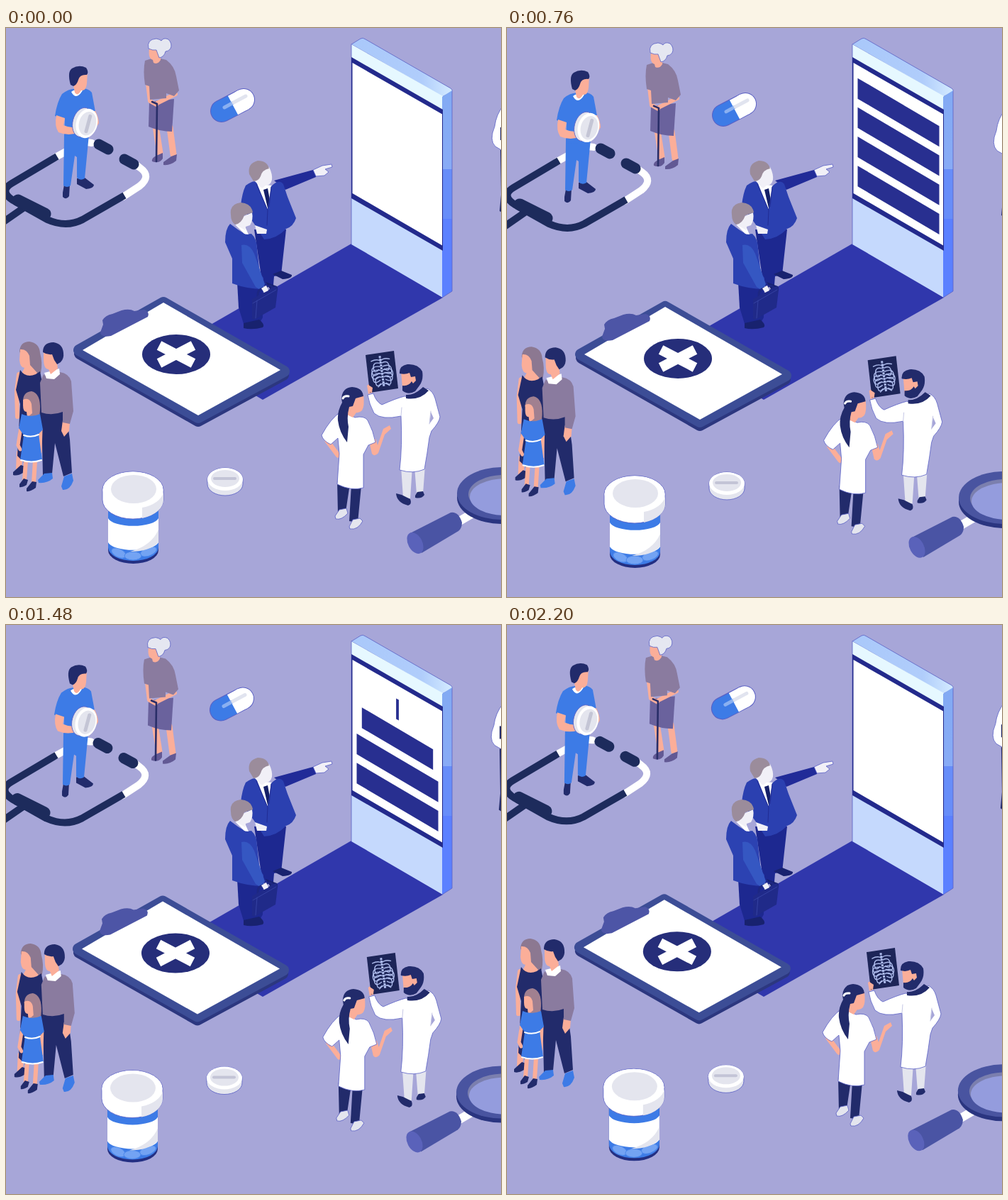
Recreate the animation shown at these times as an HTML page. Size 698 px wide and 802 px high, loop 2.24 s.

```html
<!DOCTYPE html>
<html lang="en">
<head>
<meta charset="utf-8">
<title>Isometric health scene</title>
<style>
html, body { margin: 0; width: 100%; height: 100%; overflow: hidden; background: #a7a6d8; }
svg { display: block; }
.w { fill: #fff; }
.k { fill: #fbae99; }
.b { fill: #3d7be6; }
.n { fill: #222b6b; }
.g { fill: #e4e5ee; }
.m { fill: #8a7b9f; }
.l { fill: none; stroke-linecap: round; stroke-linejoin: round; }
.flat { stroke-linecap: butt; }
.skin { stroke: #fbae99; }
.rim { stroke: #5a60c4; stroke-width: .8; }
</style>
</head>
<body>
<svg width="698" height="802" viewBox="0 0 698 802">
<defs>
  <linearGradient id="side" x2="0" y2="1"><stop stop-color="#82aaf3"/><stop offset=".38" stop-color="#88abf6"/><stop offset=".38" stop-color="#678df9"/><stop offset=".62" stop-color="#678df9"/><stop offset=".62" stop-color="#5b80ff"/></linearGradient>
  <linearGradient id="lip"><stop stop-color="#a9c8fa"/><stop offset=".7" stop-color="#b0cdfb"/><stop offset="1" stop-color="#d4ebff"/></linearGradient>
</defs>

<!-- carpet and phone -->
<path fill="#3037ac" d="M487 304L616 380 362 524 235 449Z"/>
<path fill="url(#lip)" class="rim" d="M487 23L500 15Q503 13 507 16L627 85Q630 87 629 90L615 97Z"/>
<path fill="#e6f8ff" d="M487 23L616 96V116L487 42Z"/>
<path class="w" d="M487 44L616 118V310L487 236Z"/>
<path fill="#c5d9fd" d="M487 238L616 312V380L487 305Z"/>
<path fill="url(#side)" d="M615 97L629 88V371L615 380Z"/>
<path class="l rim" d="M487 305V23M615 380L629 371V90"/>
<path fill="#232a8c" d="M487 41L616 115V122L488.500 49V233L616 307V314L487 240Z"/>
<path class="l" stroke="#232a8c" d="M615.500 116V312"/>
<g id="bars" fill="#282f90"></g>

<!-- pointing man -->
<path fill="#1d2890" d="M350 284L395 284 391 320 388 348 378 350 377 362 362 364Z"/>
<path fill="#18226f" d="M376 347L388 342 403 348Q404 353 390 354ZM366 358L382 364Q386 372 376 374Z"/>
<path fill="#212b98" d="M378 215L433 200Q438 203 437 210L394 228Z"/>
<path fill="#f1f0f7" class="rim" d="M433 200L446 194 459 192 460 196 450 199 455 203 449 208 437 209Z"/>
<path class="w" d="M353 216L366 221 375 222 372 256 364 253Z"/>
<path fill="#141f68" d="M363 228L369 226 374 253 370 258Z"/>
<path fill="#2b40b0" d="M338 222Q349 214 353 217L369 256 374 223Q385 212 391 220L397 238 409 268Q405 280 395 283 382 297 364 298L350 276 331 250Q333 232 338 222Z"/>
<path class="l" stroke="#212c94" d="M353 220L369 257 368 278M374 224L371 252"/>
<path fill="#f1f0f7" d="M357 202L371 196Q376 206 375 214 373 222 366 222L361 226 350 215Z"/>
<path fill="#9b8c9b" d="M343 206Q340 191 355 187 368 187 371 198 361 200 359 209 356 216 349 216Z"/>

<!-- man with briefcase -->
<path fill="#1d2890" d="M326 358L363 365 362 408 357 417 336 420 328 394Z"/>
<path fill="#18226f" d="M335 416L357 411Q366 418 362 422 347 426 335 423Z"/>
<path fill="#2c42b2" d="M316 276Q326 284 338 291L346 290Q354 297 354 311L358 347 363 352V368Q340 368 319 360V325L309 302Q309 283 316 276Z"/>
<path class="w" d="M323 277L337 280 342 291 336 290Z"/>
<path fill="#f1f0f7" d="M334 266L347 260Q349 270 344 278L338 280 337 285 324 277ZM351 278L368 284 367 290 354 290Z"/>
<path fill="#9b8c9b" d="M317 263Q315 248 331 246 346 247 348 260L336 264Q332 276 323 277 317 273 317 263Z"/>
<path fill="#3557c2" d="M332 306Q343 303 350 318L365 361 360 370 352 365 333 331Z"/>
<path class="l" stroke="#1d2782" stroke-width="3" d="M355 378Q354 369 362 367L371 363Q376 363 376 369"/>
<path fill="#202a89" d="M347 382L379 364Q383 364 383 369L380 394 350 411Q346 411 347 406Z"/>
<path class="l" stroke="#3542a3" d="M348 388L381 369M354 384L352 409"/>
<path fill="#f1f0f7" d="M360 367L367 363 370 370 364 373Z"/>

<!-- gently bobbing objects -->
<g id="bob">
  <!-- stethoscope -->
  <g class="l" stroke-width="10">
    <path stroke="#fff" d="M70 182L103 164Q110 160 121 162M165 238L188 223Q206 209 189 197L181 191"/>
    <path class="flat" stroke="#1d2b5c" d="M72 181L8 219Q-10 230 10 243L58 270Q85 282 108 270L167 236M30 250L-12 279"/>
    <path stroke="#1d2b5c" stroke-width="15" d="M131 164L144 171M167 185L180 192"/>
    <path stroke="#1d2b5c" stroke-width="17" d="M17 243L55 262"/>
  </g>

  <!-- nurse with tablet -->
  <path class="n" d="M80 232L82 221 90 220 89 237Q85 243 80 238ZM100 212L111 211 124 221Q124 226 113 227L100 220Z"/>
  <path class="b" d="M82 150H117L111 212Q105 216 100 211V182L97 180 91 222Q86 226 81 222Z"/>
  <path class="b" d="M79 93Q90 84 101 86 115 83 121 91L126 118 114 120 116 156 82 157 83 128 69 124Q72 104 79 93Z"/>
  <path class="k" d="M71 123L83 127 81 137Q92 142 103 139L104 147Q88 153 74 147 68 138 71 123ZM117 117L126 117Q131 127 131 134 128 141 121 139Z"/>
  <path class="w" d="M92 90Q99 103 108 88L105 86 95 88Z"/>
  <path class="k" d="M92 66L97 91Q101 97 106 88 113 89 114 78L115 62Z"/>
  <path class="n" d="M91 80Q86 62 93 57 103 51 113 56 117 62 114 66 104 65 102 73 100 80 95 82Z"/>
  <g transform="rotate(15 112 134)">
    <ellipse class="g rim" cx="108" cy="134" rx="14" ry="21"/>
    <ellipse class="w" cx="114" cy="134" rx="15" ry="21"/>
    <ellipse class="g" cx="115" cy="134" rx="12" ry="17"/>
    <path class="l" stroke="#c4c5d5" stroke-width="5" d="M116 123V145"/>
  </g>

  <!-- elderly woman -->
  <path class="l skin" stroke-width="9" d="M211 138L217 176M231 140L236 178"/>
  <path fill="#625994" d="M206 188Q205 183 212 180L221 176 221 184Q216 192 206 188ZM222 189L233 181 241 178 240 187Q232 194 222 193Z"/>
  <path fill="#6a629d" d="M202 104L237 100 234 146Q217 146 201 139Z"/>
  <path class="l skin" stroke-width="6" d="M200 78L203 103 212 108M239 93L213 106"/>
  <path class="m" d="M196 46Q210 40 226 45 238 54 240 68L244 88 237 96 226 92 226 99 203 101 202 82 196 80Q193 60 196 46Z"/>
  <path class="k" d="M202 29Q200 43 207 45L208 49Q214 52 218 45L218 29Z"/>
  <path class="rim" fill="#e5e7f1" d="M201 29Q198 16 212 15 217 16 219 18 222 13 229 16 235 22 232 29 229 33 225 33 223 41 216 42L212 31Q207 32 201 29Z"/>
  <path class="l" stroke="#292e68" stroke-width="2.6" d="M206 104L213 107 212 188"/>

  <!-- capsule -->
  <g class="l">
    <path stroke="#5a60c4" stroke-width="32" d="M304 117L335 101"/>
    <path stroke="#3d7be6" stroke-width="30" d="M304 117L320 109"/>
    <path stroke="#fff" stroke-width="30" d="M334 101.500L335 101"/>
    <path class="flat" stroke="#fff" stroke-width="30" d="M320 109L335 101"/>
    <path stroke="#8ab0f1" stroke-width="5" d="M308 112L319 106"/>
    <path stroke="#e1e4ef" stroke-width="5" d="M321 105L338 96"/>
  </g>

  <!-- clipboard -->
  <g stroke-width="16" stroke-linejoin="round">
    <path fill="#2c377f" stroke="#2c377f" d="M222 392L391 489 271 554 104 459Z"/>
    <path fill="#3c4d96" stroke="#3c4d96" d="M222 387L392 484 271 549 103 454Z"/>
  </g>
  <path class="w" d="M222 387L387 482 271 546 108 454Z"/>
  <path fill="#4d55a6" d="M133 429L137 418 136 412Q140 405 150 403L163 398Q174 395 181 399L195 397Q203 400 200 407L148 434Q134 437 133 429Z"/>
  <ellipse fill="#262e7a" cx="240" cy="460" rx="48" ry="28"/>
  <path class="l flat" stroke="#fff" stroke-width="14" d="M216 447.500L264 472.500M264 447.500L216 472.500"/>

  <!-- pill bottle -->
  <path fill="#232f82" d="M144 680H215V736A35.5 19 0 0 1 144 736Z"/>
  <path class="b" d="M144 680H215V732A35.5 19 0 0 1 144 732Z"/>
  <g fill="#73a3f3" stroke="#4b87ea">
    <ellipse cx="159" cy="740" rx="11" ry="6" transform="rotate(25 159 740)"/>
    <ellipse cx="201" cy="738" rx="12" ry="6" transform="rotate(-20 201 738)"/>
    <ellipse cx="179" cy="744" rx="12" ry="6"/>
  </g>
  <path class="w" d="M144 691A36 13 0 0 0 215 691V725A36 13 0 0 1 144 725Z"/>
  <path class="g" d="M215 707V725Q202 738 175 738 205 730 215 707Z"/>
  <path class="w rim" d="M136 651V665A43 27 0 0 0 222 665V651A43 26 0 0 0 136 651Z"/>
  <path class="g" d="M222 654V665A43 27 0 0 1 192 691V676A43 26 0 0 0 222 654Z"/>
  <ellipse class="w" cx="179" cy="651" rx="42.500" ry="25.500"/>
  <ellipse class="g" cx="180" cy="650" rx="32" ry="20"/>

  <!-- round tablet -->
  <path class="g rim" d="M284 636V643A25 16 0 0 0 334 643V636A25 16 0 0 0 284 636Z"/>
  <ellipse class="w" cx="309" cy="636" rx="25" ry="16"/>
  <ellipse class="g" cx="309" cy="635" rx="20" ry="12"/>
  <path class="l" stroke="#c3c4d6" stroke-width="4" d="M294 635H323"/>

  <!-- magnifier -->
  <path class="l" stroke="#fff" stroke-width="12" d="M636 697L660 683"/>
  <ellipse fill="#2a3580" cx="700" cy="662" rx="64" ry="37"/>
  <ellipse fill="#4954a0" cx="700" cy="656" rx="64" ry="37"/>
  <ellipse fill="#7b7fae" cx="702" cy="657" rx="50" ry="27"/>
  <ellipse fill="#949cdd" cx="704" cy="661" rx="50" ry="26"/>
  <path fill="#4a54a4" d="M570 712L627 683Q638 681 643 697 643 705 638 709L586 740Z"/>
  <ellipse fill="#5a62ba" cx="577" cy="726" rx="10" ry="16" transform="rotate(-28 577 726)"/>

  <!-- figure at the edge -->
  <path class="w rim" d="M702 108Q691 122 689 139 681 158 690 167L702 174Z"/>
  <path class="n" d="M697 140H702V158H697ZM697 172H702V262L696 258 698 235Z"/>
</g>

<!-- people drifting sideways -->
<g id="drift">
  <!-- family -->
  <path class="k" d="M15 596L24 600 22 620 14 622Z"/>
  <path class="n" d="M10 626L21 616 27 618 24 627Q16 632 10 630Z"/>
  <path class="l skin" stroke-width="6" d="M18 488L15 512 16 548"/>
  <path fill="#8c7891" d="M19 456Q20 442 33 442 47 444 48 458 52 472 49 486L36 490Z"/>
  <path class="k" d="M20 453Q29 452 33 462L34 475 44 486 36 496 22 487 26 479Q20 479 19 468Z"/>
  <path class="n" d="M20 482Q28 494 42 488L48 484 53 510 50 600 25 612 16 603 20 530 14 510Z"/>
  <path class="n" d="M50 538H84L90 580 93 627 81 632 69 585 65 628 52 631Z"/>
  <path class="b" d="M45 637L54 628 65 627 66 635Q58 642 46 641ZM78 646L82 632 93 628 95 638Q90 652 80 651Z"/>
  <path class="k" d="M80 553L90 556 89 568 82 576 78 568Z"/>
  <path class="m" d="M53 488Q62 496 76 485 89 487 92 498L95 540 90 558 80 556V541Q65 547 50 542L48 500Z"/>
  <path class="w" d="M54 486L62 484 75 480 76 488 68 495 57 494Z"/>
  <path class="k" d="M53 455L70 456 73 480 63 488 60 481Q53 481 53 466Z"/>
  <path class="n" d="M52 457Q52 443 67 443 80 445 81 458 82 466 77 471L72 474 68 468 65 460Q58 461 52 457Z"/>
  <path class="l skin" stroke-width="6" d="M28 610L26 638M41 610L39 641"/>
  <path class="n" d="M19 643L25 635 31 637 29 644Q22 648 19 647ZM29 649L37 639 43 640 42 648Q34 654 29 653Z"/>
  <path fill="#a18090" d="M24 526Q24 513 36 512 49 515 48 538L47 551 34 549Z"/>
  <path class="k" d="M24 524Q33 520 36 530L37 543 30 549 29 541Q24 541 24 532Z"/>
  <path class="l skin" stroke-width="5" d="M21 562L17 588 20 594M49 566L48 598"/>
  <path class="b" d="M22 544Q34 550 48 544L52 566 46 572 51 609Q36 615 20 609L25 574 18 564Z"/>
  <path class="l" stroke="#fff" stroke-width="2" d="M25 574Q36 578 46 573M21 609Q36 614 50 609"/>

  <!-- doctor with ponytail -->
  <path class="n" d="M467 638L485 642 479 682 468 684ZM487 643L501 645 496 697 484 695Z"/>
  <path class="g rim" d="M464 688L470 679 480 677 482 684Q473 694 465 692ZM484 703L489 693 499 691 503 695Q496 708 485 706Z"/>
  <path class="l skin" stroke-width="7" d="M453 582L468 602"/>
  <path class="k" d="M512 582L521 579 524 588 532 565 541 560 543 565 534 573 525 599Q520 605 516 600Z"/>
  <path class="w rim" d="M472 541Q478 538 484 545L492 549Q505 546 510 553 518 568 521 584L511 588 504 601V648Q487 653 467 643L470 600 468 578 458 587Q447 582 445 574 458 550 472 541Z"/>
  <path class="k" d="M486 522L504 517Q506 533 502 539 498 543 494 542L489 549 481 545Z"/>
  <path class="n" d="M473 522Q474 507 488 506 503 507 504 519L493 522 489 533 484 534Q480 548 483 562L481 584Q470 570 468 553 467 540 474 528Z"/>
  <path class="l" stroke="#fff" stroke-width="3" d="M475 522Q477 518 483 519"/>

  <!-- bearded doctor -->
  <path class="g" d="M557 618H573L570 663 560 662ZM576 618L591 616 588 656 579 657Z"/>
  <path class="n" d="M550 656L558 658 570 664Q573 671 567 673 551 669 550 656ZM577 659L580 654 588 653 590 658Q586 664 577 662Z"/>
  <path class="w rim" d="M562 519Q580 524 594 508 602 512 605 522L612 548Q611 556 600 568L597 577Q594 600 590 622 574 629 555 623 559 590 557 547 530 553 519 543 512 530 510 517L518 515Q522 527 530 531 550 522 562 519Z"/>
  <path fill="#a7a6d8" d="M599 541L603 550 597 558Z"/>
  <path class="l" stroke="#c6c8e6" d="M557 547L558 535M597 558L599 540"/>
  <path class="n" d="M564 517Q576 518 588 506L596 511Q584 525 564 522Z"/>
  <path class="k" d="M557 484L577 482 583 503 572 514 559 507Z"/>
  <path class="n" d="M555 487Q554 476 566 474 581 473 587 484 589 496 583 504L577 512Q567 518 559 511L559 504Q568 505 572 498L574 501 578 497 577 491 571 492 569 486Q563 489 555 487Z"/>
  <path class="k" d="M509 504L515 500 518 513 511 516Z"/>
  <path fill="#1d2558" d="M507 461L547 455 553 508 513 514Z"/>
  <g id="ribs" class="l" stroke="#aebced" stroke-width="1.4" transform="translate(530 484) rotate(-8)">
    <path class="flat" stroke-width="3" stroke-dasharray="3 1" d="M0-22V22"/>
    <path d="M-13-16Q-5-19 0-15 5-19 13-16M-8 21Q0 13 8 21"/>
  </g>
  <path class="k" d="M511 503L517 507 516 514 512 513Z"/>
</g>
</svg>

<script>
const LOOP = 2240, STEP = 40;
const byId = id => document.getElementById(id);
const ease = u => (1 - Math.cos(Math.PI * Math.min(1, Math.max(0, u)))) / 2;
const move = (id, x, y) => byId(id).setAttribute('transform', `translate(${x.toFixed(2)} ${y.toFixed(2)})`);
const draw = (parent, tag, attrs) => {
  const el = document.createElementNS('http://www.w3.org/2000/svg', tag);
  for (const k in attrs) el.setAttribute(k, attrs[k]);
  return byId(parent).appendChild(el);
};

for (let i = 0; i < 5; i++) {
  const y = i * 5 - 12, w = 11 + 4 * Math.sin(i * .8);
  draw('ribs', 'path', { d: `M-2 ${y}Q${-w} ${y - 3} ${-w} ${y + 6}T-4 ${y + 9}M2 ${y}Q${w} ${y - 3} ${w} ${y + 6}T4 ${y + 9}` });
}
const bars = [0, 1, 2, 3].map(() => draw('bars', 'rect', { x: -57.5, y: -14.5, width: 115, height: 29 }));

// [time, x, y] of the drifting people
const path = [[0, 0, 0], [600, 0, 7], [1140, 8, 8], [1720, -1.8, 6.4], [LOOP, 0, 0]];

function frame(now) {
  const t = Math.floor(now % LOOP / STEP) * STEP;

  const s = Math.sin(Math.PI * t / 1120);
  move('bob', 1.2 * s, s > 0 ? 7 * s : -3 * s);

  const i = path.findIndex(p => p[0] > t);
  const [a, b] = [path[i - 1], path[i]];
  const u = ease((t - a[0]) / (b[0] - a[0]));
  move('drift', a[1] + (b[1] - a[1]) * u, a[2] + (b[2] - a[2]) * u);

  // bars open and close from their middle, one after another
  bars.forEach((bar, n) => {
    const d = 135 * n;
    const k = ease((t - d) / 207) - ease((t - 1297 - d) / 207);
    bar.setAttribute('transform', `translate(552 ${119 + 41.2 * n}) skewY(30.5) scale(${k.toFixed(3)} 1)`);
  });
  requestAnimationFrame(frame);
}
frame(0);
</script>
</body>
</html>
```
